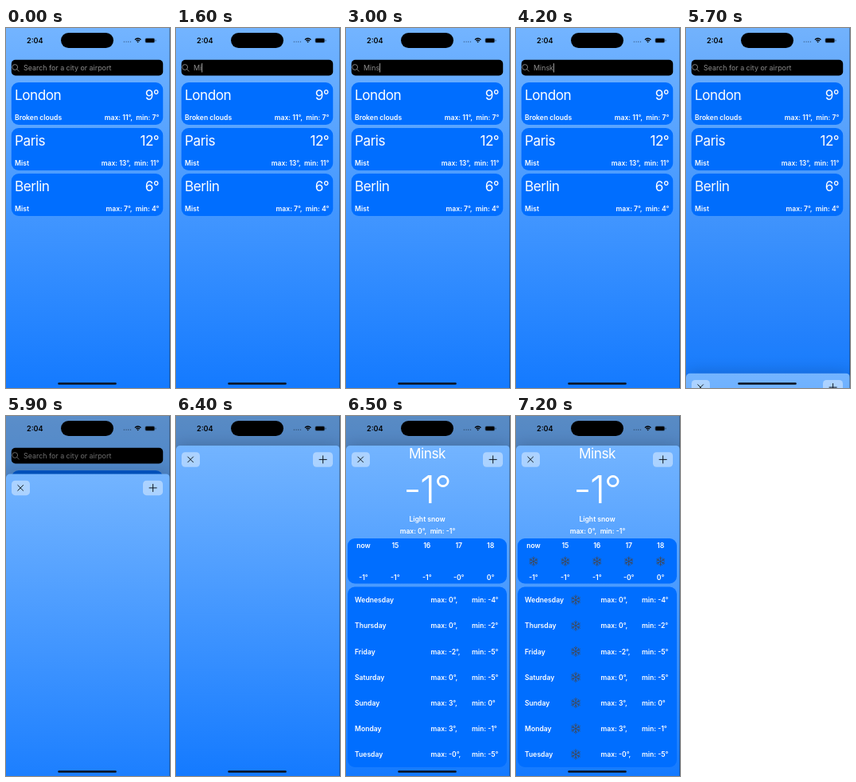
These frames come from a looping animation (206x450 px, 8 s). An HTML page with a canvas:

```html
<!DOCTYPE html>
<html lang="en">
<head>
<meta charset="utf-8">
<title>Weather search</title>
<style>
html, body { margin: 0; width: 100%; height: 100%; overflow: hidden; background: #73b4ff; }
canvas { display: block; width: 206px; height: 450px; }
</style>
</head>
<body>
<canvas id="stage"></canvas>
<script>
const W = 206, H = 450, LOOP = 8000, STEP = 100;
const SHEET_TOP = 37, SHEET_START = 5682.3, SPRING = 0.01874;
const CARD = '#006eff', GREY = '#8c8c8c', FLAKE = '#44474e', INK = '#101820';
const FONT = 'Inter, "Liberation Sans", sans-serif';

const canvas = document.getElementById('stage');
const ratio = window.devicePixelRatio || 1;
canvas.width = Math.round(W * ratio);
canvas.height = Math.round(H * ratio);
const ctx = canvas.getContext('2d');

const cities = [
  ['London', '9°', 'Broken clouds', 'max: 11°,  min: 7°'],
  ['Paris', '12°', 'Mist', 'max: 13°,  min: 11°'],
  ['Berlin', '6°', 'Mist', 'max: 7°,  min: 4°']
];
const hours = [['now', '-1°'], ['15', '-1°'], ['16', '-1°'], ['17', '-0°'], ['18', '0°']];
const days = [
  ['Wednesday', '0°', '-4°'], ['Thursday', '0°', '-2°'], ['Friday', '-2°', '-5°'],
  ['Saturday', '0°', '-5°'], ['Sunday', '3°', '0°'], ['Monday', '3°', '-1°'],
  ['Tuesday', '-0°', '-5°']
];
const QUERY = 'Minsk';
const keyTimes = [1000, 1600, 2100, 2600, 3200];
const FOCUS = 200, SUBMIT = 5400, LOADED = 6500, ICONS = 6600;

function box(x, y, w, h, r, color) {
  ctx.fillStyle = color;
  ctx.beginPath();
  ctx.roundRect(x, y, w, h, r);
  ctx.fill();
}

function line(points, color, width) {
  ctx.strokeStyle = color;
  ctx.lineWidth = width;
  ctx.lineCap = 'round';
  ctx.beginPath();
  for (const [x1, y1, x2, y2] of points) {
    ctx.moveTo(x1, y1);
    ctx.lineTo(x2, y2);
  }
  ctx.stroke();
}

function text(str, x, y, { size = 8.6, weight = 600, color = '#fff', align = 'left', gap = 0 } = {}) {
  ctx.font = `${weight} ${size}px ${FONT}`;
  ctx.letterSpacing = gap + 'px';
  ctx.textAlign = align;
  ctx.fillStyle = color;
  ctx.fillText(str, x, y);
}

const title = (str, x, y, align) => text(str, x, y, { size: 17.2, weight: 400, gap: -0.5, align });

function sky(top, height) {
  const g = ctx.createLinearGradient(0, top, 0, top + height);
  g.addColorStop(0, '#73b4ff');
  g.addColorStop(1, '#147aff');
  return g;
}

function statusBar() {
  text('2:04', 26, 18.6, { size: 9.1, color: '#000' });
  box(69, 6, 66, 19, 9.5, '#000');
  for (let i = 0; i < 4; i++) box(147.7 + i * 2.7, 16.6, 1.3, 1.3, 0.65, 'rgba(0,0,0,.45)');
  ctx.strokeStyle = '#000';
  ctx.lineCap = 'butt';
  ctx.lineWidth = 1.4;
  for (const r of [2.9, 5.2]) {
    ctx.beginPath();
    ctx.arc(165.7, 18.2, r, -Math.PI * 0.76, -Math.PI * 0.24);
    ctx.stroke();
  }
  ctx.fillStyle = '#000';
  ctx.beginPath();
  ctx.moveTo(165.7, 18.6);
  ctx.arc(165.7, 18.2, 1.6, -Math.PI * 0.76, -Math.PI * 0.24);
  ctx.fill();
  box(174.5, 12.6, 12.6, 6.2, 2, 'rgba(0,0,0,.4)');
  box(175.3, 13.3, 11, 4.8, 1.4, '#000');
  box(187.6, 14.6, 0.9, 2.2, 0.5, 'rgba(0,0,0,.5)');
}

function searchBar(t) {
  box(6.8, 39.7, 190.4, 19.8, 5, '#000');
  ctx.strokeStyle = GREY;
  ctx.lineWidth = 0.9;
  ctx.beginPath();
  ctx.arc(11.2, 49, 3.4, 0, Math.PI * 2);
  ctx.stroke();
  line([[13.7, 51.5, 16.3, 54.1]], GREY, 0.9);

  const active = t >= FOCUS && t < SUBMIT;
  const typed = active ? QUERY.slice(0, keyTimes.filter(k => t >= k).length) : '';
  text(typed || 'Search for a city or airport', 22, 53.1, { size: 8.9, weight: 400, color: GREY });
  if (!active) return;
  const lastKey = keyTimes[keyTimes.length - 1];
  const visible = t < lastKey || Math.floor((t - lastKey) / 500) % 2 === 0;
  if (visible) {
    const end = typed ? 22 + ctx.measureText(typed).width : 21.5;
    box(end, 44, 1, 11.5, 0.5, '#a0a0a0');
  }
}

function cityCard([name, temp, weather, range], i) {
  const y = 68 + i * 57;
  box(6.8, y, 190.4, 53, 9, CARD);
  title(name, 11, y + 22.2);
  title(temp, 192.2, y + 22.2, 'right');
  text(weather, 11, y + 46.7);
  text(range, 192.4, y + 46.7, { align: 'right' });
}

function snowflake(x, y, r) {
  const strokes = [];
  for (let i = 0; i < 6; i++) {
    const a = i * Math.PI / 3 + Math.PI / 6;
    const at = (d, turn = 0) => [x + Math.cos(a + turn) * d, y + Math.sin(a + turn) * d];
    strokes.push([x, y, ...at(r)]);
    for (const side of [-1, 1]) strokes.push([...at(r * 0.5), ...at(r * 0.86, side * 0.33)]);
  }
  line(strokes, FLAKE, 0.8);
}

function forecast(showIcons) {
  const mid = { align: 'center' };
  title('Minsk', 102, 53.3, 'center');
  text('-1°', 102, 108.5, { size: 48.5, weight: 300, gap: -1.4, align: 'center' });
  text('Light snow', 102, 132, mid);
  text('max: 0°,  min: -1°', 102.5, 147, mid);

  box(2, 153, 200, 56.5, 9, CARD);
  hours.forEach(([hour, temp], i) => {
    const x = 22 + i * 39.9;
    text(hour, x, 164.5, mid);
    text(temp, x, 204.8, mid);
    if (showIcons) snowflake(x, 181.7, 5.7);
  });

  box(2, 213.5, 200, 225.5, 9, CARD);
  days.forEach(([day, max, min], i) => {
    const y = 230 + i * 32.15;
    text(day, 11, y + 3.2);
    text(`max: ${max},`, 106.5, y + 3.2);
    text(`min: ${min}`, 158, y + 3.2);
    if (showIcons) snowflake(75, y, 6.2);
  });
}

function sheet(t) {
  // Critically damped spring
  const wt = Math.max(0, t - SHEET_START) * SPRING;
  const shown = 1 - (1 + wt) * Math.exp(-wt);
  if (shown <= 0) return;
  ctx.fillStyle = `rgba(0,0,0,${0.23 * shown})`;
  ctx.fillRect(0, 0, W, H);

  const height = H - SHEET_TOP;
  const top = H - height * shown;
  ctx.shadowColor = 'rgba(0,0,0,.2)';
  ctx.shadowBlur = 20 * ratio;
  box(0, top, W, height, [5, 5, 0, 0], sky(top, height));
  ctx.shadowColor = 'transparent';

  const cy = top + 17.4;
  for (const [x, w] of [[7, 23], [172, 25]]) box(x, cy - 9.2, w, 18.5, 4.5, 'rgba(255,255,255,.42)');
  line([[14.8, cy - 3.4, 21.6, cy + 3.4], [21.6, cy - 3.4, 14.8, cy + 3.4]], INK, 1);
  line([[180, cy, 189.2, cy], [184.6, cy - 4.6, 184.6, cy + 4.6]], INK, 1);
  if (t >= LOADED) forecast(t >= ICONS);
}

function draw(t) {
  ctx.setTransform(ratio, 0, 0, ratio, 0, 0);
  ctx.fillStyle = sky(0, H);
  ctx.fillRect(0, 0, W, H);
  searchBar(t);
  cities.forEach(cityCard);
  sheet(t);
  statusBar();
  box(65.2, 443.2, 73.6, 2.6, 1.3, '#08101c');
  box(205, 0, 1, H, 0, 'rgba(0,0,0,.3)');
}

const start = performance.now();
function tick() {
  const t = (performance.now() - start) % LOOP;
  draw(Math.floor(t / STEP) * STEP);
  requestAnimationFrame(tick);
}
tick();
</script>
</body>
</html>
```
